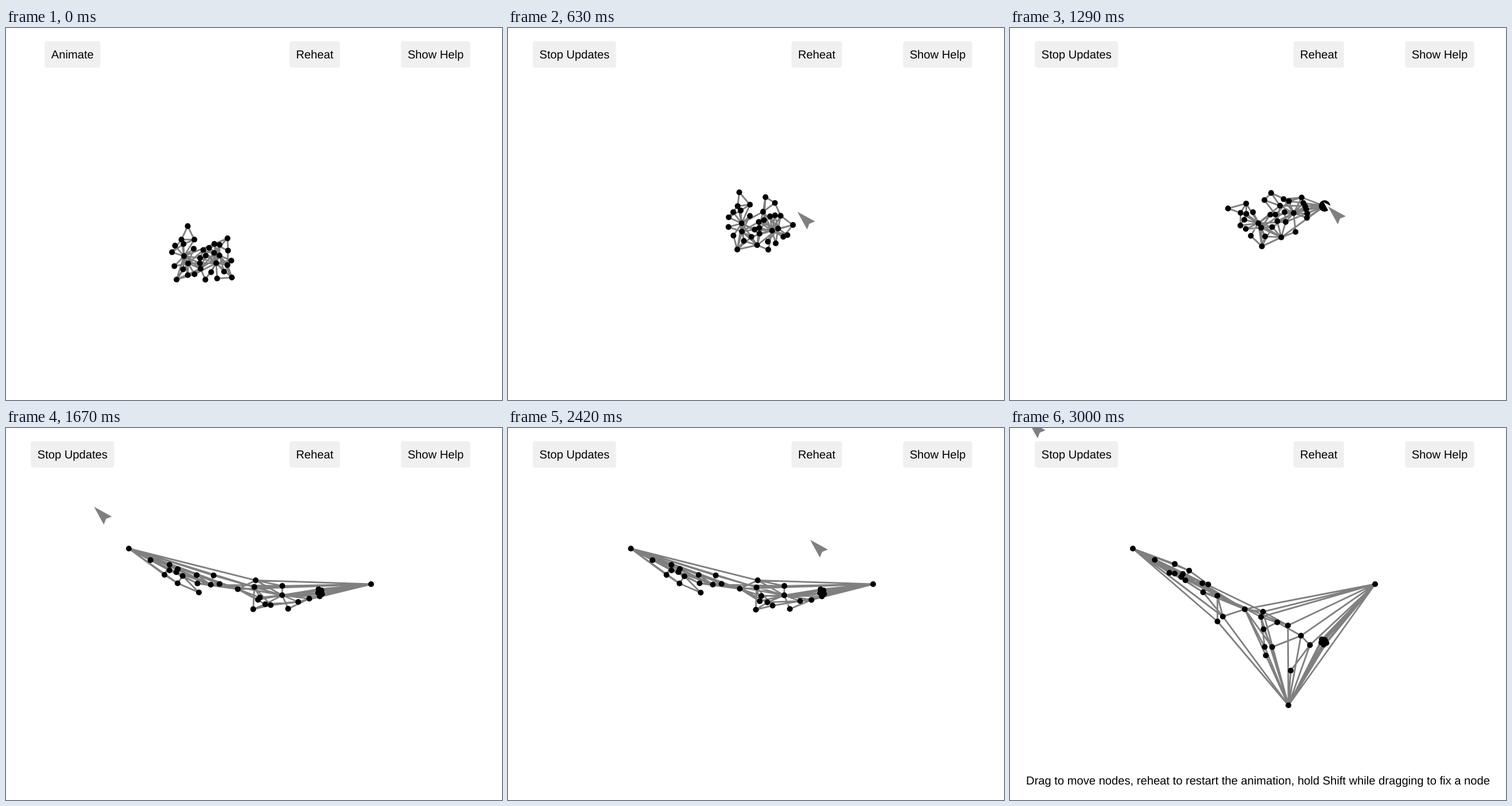
Animation of 864 by 648 pixels, one loop 3040 ms. Source, as an HTML page with a canvas:

```html
<!DOCTYPE html>
<html lang="en">
<head>
<meta charset="utf-8">
<title>Force layout</title>
<style>
html, body { margin: 0; width: 100%; height: 100%; overflow: hidden; background: #fff }
canvas { display: block }
</style>
</head>
<body>
<canvas id="stage" width="864" height="648"></canvas>
<script>
const ctx = document.getElementById('stage').getContext('2d');
const STEPS = 73, RATE = 24 / 1000, LOOP = 3040, COUNT = 34;
const LENGTH = 24, CHARGE = 10, GRAVITY = 0.1, ALPHA = 0.5, DAMPING = 0.6, TICKS = 12;

// Karate club graph: each node with its higher-numbered neighbours
const links = {
  1: [2, 3, 4, 5, 6, 7, 8, 9, 11, 12, 13, 14, 18, 20, 22, 32],
  2: [3, 4, 8, 14, 18, 20, 22, 31], 3: [4, 8, 9, 10, 14, 28, 29, 33],
  4: [8, 13, 14], 5: [7, 11], 6: [7, 11, 17], 7: [17], 9: [31, 33, 34],
  10: [34], 14: [34], 15: [33, 34], 16: [33, 34], 19: [33, 34], 20: [34],
  21: [33, 34], 23: [33, 34], 24: [26, 28, 30, 33, 34], 25: [26, 28, 32],
  26: [32], 27: [30, 34], 28: [34], 29: [32, 34], 30: [33, 34],
  31: [33, 34], 32: [33, 34], 33: [34]
};

// A few nodes steer the layout until it is stretched; forces place the rest
const guideSteps = [0, 8, 21, 31];
const guides = {
  1: [[309, 397], [406, 333], [407, 346], [433, 341]],
  3: [[339, 419], [425, 379], [443, 380], [474, 367]],
  4: [[295, 440], [389, 386], [406, 390], [439, 383]],
  10: [[346, 439], [435, 400], [468, 377], [500, 357]],
  17: [[316, 344], [425, 276], [382, 293], [378, 315]],
  25: [[387, 366], [466, 298], [435, 289], [444, 299]],
  30: [[396, 437], [492, 357], [505, 331], [510, 295]],
  32: [[365, 376], [449, 324], [441, 315], [471, 309]],
  33: [[372, 395], [462, 360], [480, 341], [486, 338]],
  34: [[367, 409], [451, 370], [469, 339], [497, 322]]
};

// Keys are [step, x, y]
const centreKeys = [[0, 341, 402], [8, 432, 346], [31, 432, 324]];
const cursorKeys = [[1, 130, 50], [3, 130, 50], [7, 560, 46], [9, 568, 47], [12, 500, 315],
  [18, 508, 325], [21, 511, 333], [25, 736, 121], [27, 640, 150], [29, 492, 339], [31, 554, 311],
  [34, 642, 273], [36, 445, 339], [39, 220, 211], [42, 20, -10], [43, -10, -45], [46, -10, -45],
  [49, 745, 45], [50, 745, 45], [53, 576, 45], [54, 576, 45], [61, 489, 307], [63, 489, 307],
  [68, 491, 484], [72, 31, -13]];
const drags = [
  { from: 22, to: 25, node: 30 },
  { from: 29, to: 34, node: 33, fix: true },
  { from: 36, to: 39, node: 1, fix: true },
  { from: 62, to: 68, node: 34, fix: true }
];
const help = 'Drag to move nodes, reheat to restart the animation, hold Shift while dragging to fix a node';

const within = (k, a, b) => k >= a && k <= b;

function sample(keys, k) {
  const i = keys.findIndex(key => key[0] >= k);
  if (i < 0) return keys[keys.length - 1].slice(1);
  if (i === 0) return keys[0].slice(1);
  const a = keys[i - 1], b = keys[i], s = (k - a[0]) / (b[0] - a[0]);
  return a.slice(1).map((v, j) => v + (b[j + 1] - v) * s);
}

const cursorAt = k => k < 1 ? [-99, -99] : sample(cursorKeys, k);
const guideAt = (n, k) => sample(guides[n].map((p, i) => [guideSteps[i], ...p]), k);
const dragAt = k => drags.find(d => within(k, d.from, d.to));

const near = {}, edges = [], nodes = [];
for (let n = 1; n <= COUNT; n++) near[n] = [];
for (const key in links) for (const b of links[key]) {
  const a = +key;
  edges.push([a, b]);
  near[a].push(b);
  near[b].push(a);
}

// Nodes without a guide begin around the mean of their guided neighbours
for (let n = 1; n <= COUNT; n++) {
  const around = (guides[n] ? [n] : near[n].filter(m => guides[m])).map(m => guides[m][0]);
  const mean = j => around.reduce((sum, p) => sum + p[j], 0) / around.length;
  const r = guides[n] ? 0 : 20;
  nodes[n] = { x: mean(0) + r * Math.cos(n * 2.4), y: mean(1) + r * Math.sin(n * 2.4), vx: 0, vy: 0 };
}

function push(n, dx, dy, f) {
  nodes[n].vx += dx * f;
  nodes[n].vy += dy * f;
}

function relax(k, ticks) {
  const pins = {}, [cx, cy] = sample(centreKeys, k);
  for (const { from, to, node, fix } of drags) {
    if (!within(k, from, fix ? STEPS : to)) continue;
    const [x, y] = cursorAt(Math.min(k, to));
    pins[node] = { x: x - 6, y: y - 1, vx: 0, vy: 0 };
  }
  while (ticks--) {
    for (const n in pins) Object.assign(nodes[n], pins[n]);
    for (const [a, b] of edges) {
      const dx = nodes[b].x - nodes[a].x, dy = nodes[b].y - nodes[a].y;
      const d = Math.hypot(dx, dy) || 1, da = near[a].length, db = near[b].length;
      const f = ALPHA * (d - LENGTH) / d / Math.min(da, db) / (da + db);
      push(a, dx, dy, f * db);
      push(b, dx, dy, -f * da);
    }
    for (let a = 1; a <= COUNT; a++) {
      const p = nodes[a];
      push(a, cx - p.x, cy - p.y, ALPHA * GRAVITY);
      for (let b = 1; b < a; b++) {
        const dx = p.x - nodes[b].x, dy = p.y - nodes[b].y;
        const f = ALPHA * CHARGE / Math.max(4, dx * dx + dy * dy);
        push(a, dx, dy, f);
        push(b, dx, dy, -f);
      }
      if (guides[a] && k <= 31) {
        const [gx, gy] = guideAt(a, k);
        push(a, gx - p.x, gy - p.y, 1);
      }
    }
    for (let n = 1; n <= COUNT; n++) {
      const p = nodes[n];
      p.vx *= DAMPING;
      p.vy *= DAMPING;
      p.x += p.vx;
      p.y += p.vy;
    }
  }
  for (const n in pins) Object.assign(nodes[n], pins[n]);
}

relax(0, 300);
const layouts = Array.from({ length: STEPS }, (_, k) => {
  if (k) relax(k, TICKS);
  return nodes.map(p => [p.x, p.y]);
});

function text(label, x, y) {
  ctx.fillStyle = '#000';
  ctx.fillText(label, x, y);
}

function button(label, x, [cx, cy]) {
  const w = ctx.measureText(label).width + 23, left = x - w / 2;
  ctx.fillStyle = within(cx, left, left + w) && within(cy, 23, 69) ? '#adbfe6' : '#f0f0f0';
  ctx.beginPath();
  ctx.roundRect(left, 23, w, 46, 4.3);
  ctx.fill();
  text(label, x, 53);
}

function drawCursor([x, y]) {
  ctx.beginPath();
  for (const [dx, dy] of [[0, 0], [31, 17], [21, 21], [17, 31]]) ctx.lineTo(x + dx, y + dy);
  ctx.closePath();
  ctx.strokeStyle = '#fff';
  ctx.lineWidth = 6;
  ctx.stroke();
  ctx.fillStyle = '#808080';
  ctx.fill();
}

function draw(k) {
  const layout = layouts[k], tip = cursorAt(k), drag = dragAt(k);
  const gap = p => Math.hypot(p[0] - tip[0], p[1] - tip[1]);
  let hot = drag ? drag.node : 0;
  if (!drag) {
    const gaps = layout.map(gap), least = Math.min(...gaps.slice(1));
    if (least < 11) hot = gaps.indexOf(least);
  }

  ctx.fillStyle = '#fff';
  ctx.fillRect(0, 0, 864, 648);
  ctx.font = '20.16px "Liberation Sans", Arial, sans-serif';
  ctx.textRendering = 'geometricPrecision';
  ctx.textAlign = 'center';
  button(k < 2 ? 'Animate' : 'Stop Updates', 115.8, tip);
  button('Reheat', 537.8, tip);
  button('Show Help', 748.4, tip);

  ctx.strokeStyle = '#808080';
  ctx.lineWidth = 2.88;
  ctx.beginPath();
  for (const [a, b] of edges) {
    ctx.moveTo(...layout[a]);
    ctx.lineTo(...layout[b]);
  }
  ctx.stroke();

  ctx.fillStyle = '#000';
  layout.forEach((p, n) => {
    ctx.beginPath();
    ctx.arc(...p, n === hot ? 10 : 5.04, 0, 7);
    ctx.fill();
  });

  if (within(k, 49, 54) || k >= 70) text(help, 432, 621);
  else if (hot && !drag) text('Node ' + hot, 432, 621);
  drawCursor(tip);
}

function tick(now) {
  const t = now % LOOP;
  draw(Math.min(STEPS - 1, Math.floor((t + 6) * RATE)));
  requestAnimationFrame(tick);
}
draw(0);
requestAnimationFrame(tick);
</script>
</body>
</html>
```
